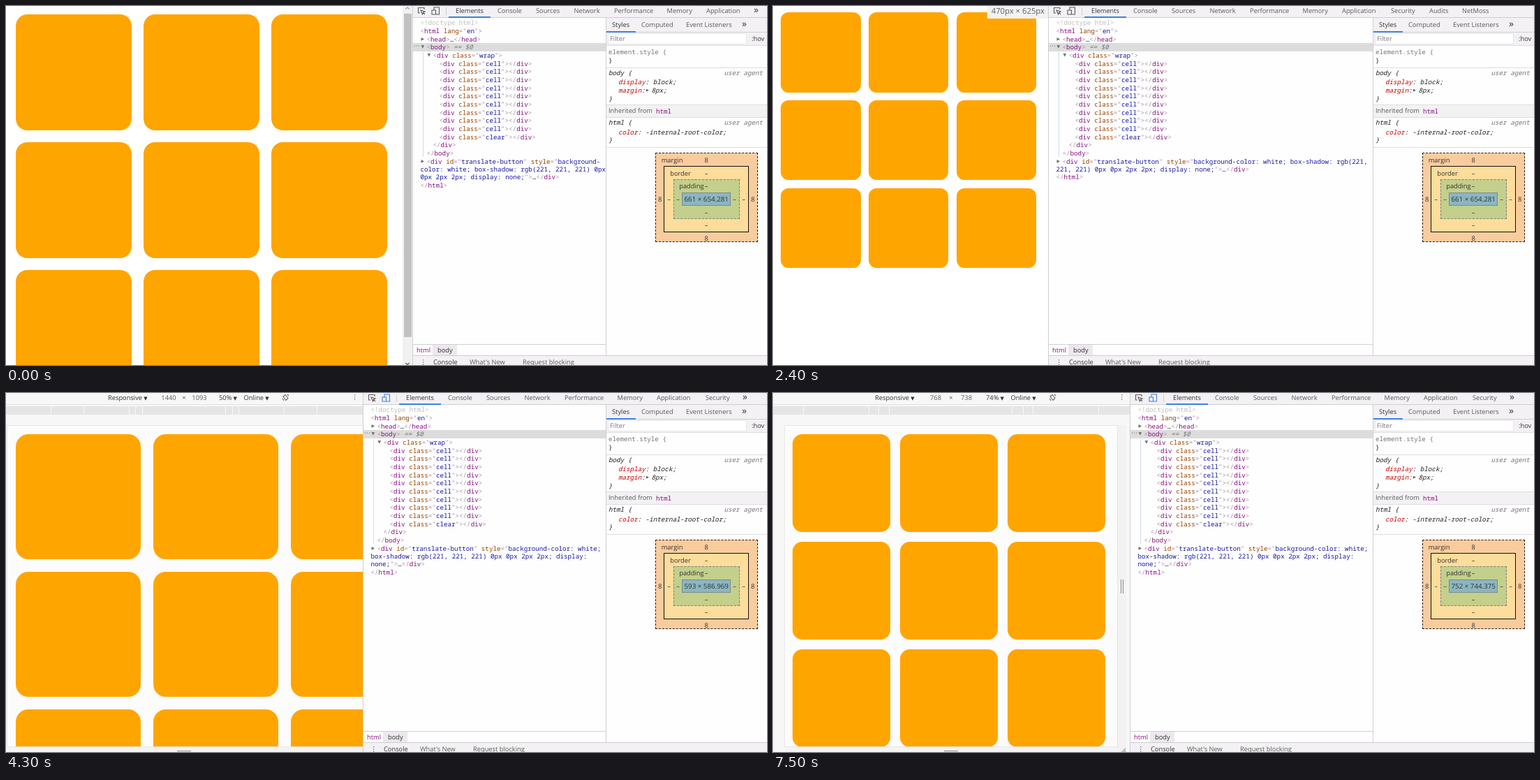
Recreate the animation shown at these times as an HTML page. Size 1090 px wide and 514 px high, loop 8200 ms.

```html
<!DOCTYPE html>
<html lang="en">
<head>
<meta charset="utf-8">
<title>Responsive grid</title>
<style>
html, body { margin: 0; width: 100%; height: 100%; overflow: hidden; background: #fff; }
#stage { position: absolute; left: 0; top: 0; width: 1090px; height: 514px; overflow: hidden;
  font: 9.3px/14px "Open Sans", sans-serif; color: #5a5a5a; text-rendering: geometricPrecision; }
.r, .t, svg { position: absolute; box-sizing: border-box; }
.r { overflow: hidden; }
.t { white-space: pre; }
.mid { transform: translateX(-50%); }
.mono, .tree { font-family: "Noto Sans Mono", monospace; font-size: 9.22px; color: #222; }
.it { font-style: italic; }
.tree { position: absolute; top: 18.4px; line-height: 11.67px; }
.row { position: relative; }
.row i { position: absolute; text-indent: 0; font: 6px/11.67px "DejaVu Sans", sans-serif; color: #6e6e6e; }
.long { line-height: 11.3px; text-indent: 9px; padding-left: 11.5px; }
.p { color: #a894a6; } .g { color: #881280; } .n { color: #994500; } .v { color: #1a1aa6; }
.red { color: #c80000; } .dim { color: #777; } .dark { color: #333; }
</style>
</head>
<body>
<div id="stage"><div id="left"></div><div id="tools"></div><div id="side"></div><div id="model"></div></div>
<script>
const LOOP = 8200, ZOOM = 0.8385, HEIGHT = 514, SIDE = 859;
const LINE = '#cfcfcf', BAR = '#f4f1f5', BLUE = '#3b82e0';
const $ = id => document.getElementById(id);

const rect = (x, y, w, h, bg, css = '', inner = '') =>
  `<div class="r" style="left:${x}px;top:${y}px;width:${w}px;height:${h}px;background:${bg};${css}">${inner}</div>`;
const text = (x, y, str, cls = '', css = '') =>
  `<span class="t ${cls}" style="left:${x}px;top:${y - 7}px;${css}">${str}</span>`;
const icon = (x, y, w, h, color, path) =>
  `<svg style="left:${x}px;top:${y}px" width="${w}" height="${h}" fill="none" stroke="${color}" stroke-width="1.1"><path d="${path}"/></svg>`;
const col = (cls, str) => `<span class="${cls}">${str}</span>`;

// ---------- timeline ----------
const DRAG = [640, 540, 430, 340, 280, 250, 262, 350, 470, 540, 582, 592, 599, 603, 606, 607, 608, 609];
const DEVICES = [
  { at: 4200, width: 1440, height: 1093, zoom: 50 },
  { at: 5100, width: 1440, height: 1562, zoom: 35 },
  { at: 5500, width: 768, height: 738, zoom: 74 },
  { at: 5900, width: 320, height: 546, zoom: 100 },
  { at: 6900, width: 768, height: 738, zoom: 74 }
];
const MODELS = [[0, '661 × 654.281'], [3500, '593 × 586.969'], [4400, '1424 × 1409.710'],
  [5100, '1424 × 1409.720'], [5600, '752 × 744.375'], [5900, '304 × 300.844'], [7000, '752 × 744.375']];
const HOVERS = [[0, 0], [5300, 768], [5500, 0], [5900, 320], [6100, 0], [6700, 768], [6900, 0]];
const valueAt = (steps, t) => steps.filter(s => s[0] <= t).pop()[1];

function stateAt(t) {
  const width = t < 1600 ? 694 : DRAG[Math.min(DRAG.length - 1, Math.floor((t - 1600) / 100))];
  return {
    width,
    split: Math.round(width * ZOOM),
    device: DEVICES.filter(d => d.at <= t).pop(),
    label: t >= 1600 && t < 3500,
    thumbHover: t >= 500 && t < 1200,
    inspect: t >= 3600 && t < 3800,
    ruler: valueAt(HOVERS, t),
    model: valueAt(MODELS, t)
  };
}

// ---------- left pane ----------
function grid(body, scale, x, y) {
  const size = 0.3 * body * scale, pitch = 0.33 * body * scale, start = (8 + 0.015 * body) * scale;
  let out = '';
  for (let i = 0; i < 9; i++)
    out += rect(x + start + (i % 3) * pitch, y + start + Math.floor(i / 3) * pitch, size, size, '#ffa500', 'border-radius:10%');
  return out;
}

function plainPage(s) {
  const scrolls = (s.width - 16) * 0.99 + 16 > 625;
  const body = s.width - 16 - (scrolls ? 17 : 0);
  let out = grid(body, ZOOM, -1, -3);
  if (scrolls) {
    const x = s.split - 14;
    out += rect(x, 0, 14, HEIGHT, '#f1f1f1') +
      rect(x + 1.5, 11, 11, 463, s.thumbHover ? '#a8a8a8' : '#c1c1c1') +
      icon(x + 4, 1, 6, 4, '#a0a0a0', 'M0 3.5L3 1L6 3.5') + icon(x + 4, 510, 6, 4, '#505050', 'M0 1L3 3.5L6 1');
  }
  if (s.inspect) out += rect(0, 0, s.split, (body * 0.99 + 16) * ZOOM - 3, 'rgba(111,168,220,.66)');
  if (s.label)
    out += `<div class="r" style="right:0;top:0;height:18px;padding:0 5px 0 6px;background:#f2f2f2;color:#606060;font-size:11.3px;line-height:16px;white-space:pre">${s.width}px × 625px</div>`;
  return rect(0, 0, s.split, HEIGHT, '#fff', '', out);
}

const BREAKPOINTS = [2560, 1440, 1024, 768, 425, 375, 320];
function ruler(zoom, hover) {
  const bars = BREAKPOINTS.map(w => {
    const span = w * zoom * 0.7475;
    return rect(255 - span / 2, 0, span, 12, w <= hover ? '#cdcdcd' : '#e5e5e5', 'border:solid #f8f8f8;border-width:0 1.5px');
  }).join('');
  const name = hover === 768 ? 'Tablet – 768px' : hover ? 'Mobile S – 320px' : '';
  return rect(0, 19, 511, 12, '#e5e5e5', '', bars) + text(255, 25, name, 'mid');
}

function devicePage(s) {
  const { width, height, zoom } = s.device, scale = zoom / 100 * ZOOM;
  const w = width * scale, x = Math.max(1.7, 254.8 - w / 2), right = x + w;
  const menu = zoom === 100 ? 347 : 341, arrow = '<span style="font:7px DejaVu Sans,sans-serif"> ▼</span>';
  return rect(0, 0, s.split, HEIGHT, '#f7f7f7', '',
    text(146, 7, 'Responsive' + arrow, 'dark') + text(233, 7, width, 'mid') + text(255, 7, '×', 'mid') + text(277, 7, height, 'mid') +
    text(305, 7, zoom + '%' + arrow, 'dark') + text(menu - 0.5, 7, 'Online' + arrow, 'dark') +
    icon(menu + 54, 1, 11, 11, '#666', 'M2 4L5 1.5L9 6.5L6 9.5Z M1 7L3 10 M8 1L10 3') + text(495, 6, '⋮', 'dark') +
    rect(0, 16, 511, 1, '#e2e2e2') + ruler(zoom / 100, s.ruler) +
    rect(right, 46, 13, 468, '#f2f2f2') + rect(x, 506, w, 8, '#f4f4f4') +
    rect(x, 46.5, w, 459.5, '#fcfcfc', 'box-shadow:0 0 0 1px #e6e6e6') +
    rect(x, 46.5, w, 459.5, 'none', '', grid(width - 16, scale, 0, 0.3)) +
    rect(right + 5, 267, 1.3, 20, '#888') + rect(right + 8, 267, 1.3, 20, '#888') +
    rect(245, 512, 20, 1.3, '#888') + icon(right + 5, 508, 8, 6, '#999', 'M1 7L7 1 M4 7L7 4'));
}

// ---------- elements panel ----------
const attr = (name, value) => ' ' + col('n', name) + col('p', '="') + col('v', value) + col('p', '"');
const open = (name, attrs = '') => col('p', '&lt;') + col('g', name) + attrs + col('p', '&gt;');
const close = name => col('p', '&lt;/') + col('g', name) + col('p', '&gt;');
const row = (indent, html, arrow = '', css = '') =>
  `<div class="row" style="padding-left:${11.5 + indent * 9}px;${css}">` +
  (arrow && `<i style="left:${3.5 + indent * 9}px">${arrow}</i>`) + html + '</div>';
const pair = cls => row(3, open('div', attr('class', cls)) + close('div'));
const LONG = `<div class="row long"><i style="left:12.5px">▶</i>` +
  col('p', '&lt;') + col('g', 'div') + attr('id', 'translate-button') + ' ' + col('n', 'style') + col('p', '="') +
  col('v', 'background-color: white; box-shadow: rgb(221, 221, 221) 0px 0px 2px 2px; display: none;') +
  '<wbr>' + col('p', '"&gt;') + '…' + close('div') + '</div>';

const tree = s => `<div class="tree" style="left:${s.split}px;width:${SIDE - s.split}px">` +
  row(0, '<span style="color:#c0c0c0">&lt;!doctype html&gt;</span>') +
  row(0, open('html', attr('lang', 'en')), '', s.inspect ? 'background:#eaf2fd' : '') +
  row(1, open('head') + '…' + close('head'), '▶') +
  row(1, open('body') + '<span class="dim it"> == $0</span><i style="left:2px;font-size:9px">⋯</i>', '▼', 'background:#dcdcdc') +
  row(2, open('div', attr('class', 'wrap')), '▼') +
  pair('cell').repeat(9) + pair('clear') +
  row(2, close('div')) + row(1, close('body')) + LONG + row(0, close('html')) + '</div>';

const TABS = [['Elements', 62, 102], ['Console', 122, 158], ['Sources', 177, 212], ['Network', 231.5, 270],
  ['Performance', 289, 345], ['Memory', 364.5, 402], ['Application', 421, 471], ['Security', 491, 527],
  ['Audits', 546, 574], ['NetMoss', 593, 630]];

function tabs(x) {
  let out = '';
  for (const [name, from, to] of TABS) {
    if (x + to > 1060) return out + text(x + from - 2, 6, '»', 'dark', 'font-size:14px');
    out += text(x + from, 7, name, name === 'Elements' ? 'dark' : '');
  }
  return out;
}

function tools(s) {
  const x = s.split;
  return rect(x, 0, 1090 - x, HEIGHT, '#fefefe') + rect(x, 0, 1090 - x, 16, BAR) + rect(x, 16, 1090 - x, 1, LINE) +
    icon(x + 7, 1, 12, 12, '#5a5a5a', 'M4 9H1.5V1.5H10V4 M5 5L11 7L8.5 8.2L7.5 11Z M8.5 8.5L11 11') +
    icon(x + 27, 1, 13, 12, s.device ? BLUE : '#5a5a5a', 'M4 5V1H11.5V11H7 M1 5H6.5V11H1Z') +
    rect(x + 48, 2, 1, 11, LINE) + tabs(x) + rect(x + 52, 15, 60, 1.7, BLUE) +
    rect(x + 15, 66, 1, 150, '#cfdcec') + tree(s) +
    rect(x, 484, SIDE - x, 1, LINE) + rect(x + 29, 485, 35, 15, '#ece8ee') +
    text(x + 6, 493, 'html', 'g') + text(x + 36, 493, 'body', 'dark') +
    rect(x, 500, 1090 - x, 14, BAR, `border-top:1px solid ${LINE}`) +
    text(x + 11, 510, '⋮', 'dark') + text(x + 30, 510, 'Console', 'dark') +
    text(x + 82, 510, 'What\'s New') + text(x + 158, 510, 'Request blocking') +
    rect(x, 0, 1, HEIGHT, LINE);
}

// ---------- styles sidebar ----------
const mono = (x, y, str, cls = '') => text(x, y, str, 'mono ' + cls);
const rule = (y, selector) => mono(863, y, selector + ' {', 'it') + mono(1028.5, y, 'user agent', 'it dim');
const prop = (y, name, value) => mono(877, y, col('red', name) + ': ' + value + ';', 'it');
function side() {
  return rect(SIDE, 17, 231, 483, '#fefefe', `border-left:1px solid ${LINE}`) +
    rect(860, 17, 230, 39, BAR) + rect(860, 37, 230, 1, LINE) + rect(860, 36.3, 42, 1.8, BLUE) +
    text(868, 27, 'Styles', 'dark') + text(910, 27, 'Computed') + text(974, 27, 'Event Listeners') +
    text(1054, 26, '»', 'dark', 'font-size:14px') +
    rect(862, 39, 199, 16, '#fff', 'border:1px solid #e6e6e6') + text(865, 47, 'Filter', 'dim') + text(1068, 47, ':hov', 'dark') +
    rect(860, 56, 230, 1, '#ddd') + mono(863, 66, 'element.style {', 'dim') + mono(863, 78, '}') + rect(860, 88, 230, 1, '#ddd') +
    rule(96, 'body') + prop(109, 'display', 'block') + mono(877, 121, col('red', 'margin') + ':', 'it') +
    text(917, 121, '▶', '', 'font:5px/14px DejaVu Sans,sans-serif') + mono(924.5, 121, '8px;', 'it') + mono(863, 133, '}', 'it') +
    rect(860, 141, 230, 19, BAR, 'border:solid #ddd;border-width:1px 0') +
    text(863, 150, 'Inherited from') + mono(931, 151, 'html', 'g') +
    rule(167, 'html') + prop(181, 'color', '-internal-root-color') + mono(863, 192, '}', 'it') + rect(860, 202, 230, 1, '#ddd');
}

function boxModel(size) {
  const mid = 1003.2, half = size.length > 13 ? 40 : 35;
  const layer = (grow, top, bottom, bg, border) =>
    rect(mid - half - grow, top, 2 * (half + grow), bottom - top, bg, 'border:1px ' + border);
  const mark = (dx, y, str) => text(mid + dx, y, str, 'mid dark');
  const ring = (dx, top, bottom, str) =>
    mark(0, top, str) + mark(0, bottom, str) + mark(-half - dx, 277, str) + mark(half + dx, 277, str);
  const name = (grow, y, str) => text(mid - half - grow, y, str, 'dark');
  return layer(38.5, 210, 338, '#f9cc9d', 'dashed #222') + layer(26, 229, 324, '#fddd9b', 'solid #111') +
    layer(12.7, 248, 305, '#c3cf8b', 'dashed #808080') + layer(0, 267, 286, '#8cb6c0', 'solid #7c8b90') +
    name(29.5, 221, 'margin') + name(17, 240, 'border') + name(4, 258, 'padding') +
    ring(31.5, 221, 333, '8') + ring(18.5, 240, 314, '–') + ring(5.5, 258, 296, '–') +
    text(mid, 277, size, 'mid dark', 'font-size:9.75px');
}

// ---------- playback ----------
$('side').innerHTML = side();
const start = performance.now();
let shown = '';
function frame() {
  const state = stateAt((performance.now() - start) % LOOP);
  const key = JSON.stringify(state);
  if (key !== shown) {
    shown = key;
    $('left').innerHTML = state.device ? devicePage(state) : plainPage(state);
    $('tools').innerHTML = tools(state);
    $('model').innerHTML = boxModel(state.model);
  }
  requestAnimationFrame(frame);
}
frame();
</script>
</body>
</html>
```
